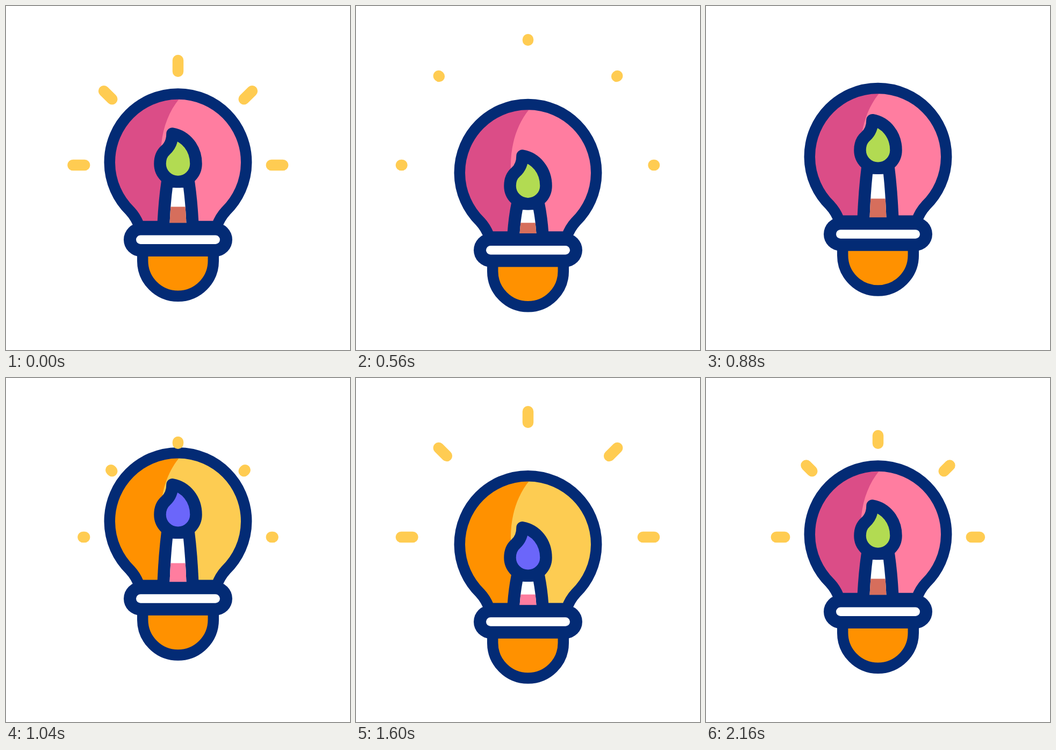
An HTML page that plays this animation: 640 px wide and 640 px high, repeating every 2200 ms.

```html
<!DOCTYPE html>
<html lang="en">
<head>
<meta charset="utf-8">
<title>Bulb and brush</title>
<style>
  html, body { margin: 0; width: 100%; height: 100%; overflow: hidden; background: #fff; }
  svg { display: block; width: 100%; height: 100%; }
  .line { stroke: #032b75; stroke-width: 20.5; stroke-linejoin: round; }
  .navy { fill: #032b75; }
  .ray { stroke: #ffcc52; stroke-width: 20.5; stroke-linecap: round; }
</style>
</head>
<body>
<svg viewBox="0 0 640 640">
  <defs>
    <path id="glassShape" d="M248 410C244 399 238 389 231 381.5A127.2 127.2 0 1 1 409 381.5C402 389 396 399 392 410Z"/>
    <clipPath id="glassClip"><use href="#glassShape"/></clipPath>
    <clipPath id="handleClip"><path id="handleClipPath"/></clipPath>
  </defs>
  <g id="bulb">
    <use id="glass" href="#glassShape"/>
    <path id="shade" clip-path="url(#glassClip)" d="M322 173C300 200 288 237 288 277C288 330 296 372 310 410H170V150H322Z"/>
    <use href="#glassShape" class="line" fill="none"/>
    <path id="handle" class="navy"/>
    <path id="handleInside" fill="#fff"/>
    <rect id="paint" x="300" width="40" height="80" clip-path="url(#handleClip)"/>
    <path id="tip" class="line" style="stroke-width:22.5"
      d="M309.5 237.5C309.5 250 306 260 297 268C290 274 286.5 283 286.5 293.5A33.5 33.5 0 0 0 353.5 293.5C353.5 265 335 242 309.5 237.5Z"/>
    <path class="line" fill="#ff9100" d="M254.2 455V474A65.8 65.8 0 0 0 385.8 474V455Z"/>
    <rect class="navy" x="219" y="403.5" width="202" height="62.5" rx="31.2"/>
    <rect x="242" y="426.5" width="156" height="16.5" rx="8.25" fill="#fff"/>
  </g>
  <g id="rays"></g>
</svg>
<script>
const LOOP = 2200, STEP = 40, BASE = 404;
const $ = id => document.getElementById(id);
const set = (node, attrs) => {
  for (const key in attrs) node.setAttribute(key, attrs[key]);
};
const clamp = u => Math.min(1, Math.max(0, u));
const ease = u => { u = clamp(u); return u * u * (3 - 2 * u); };
const mix = (a, b, u) => a + (b - a) * u;

// Each move is [start, end, value reached].
function track(rest, moves, t) {
  let value = rest;
  for (const [start, end, next] of moves) {
    if (t < start) break;
    value = mix(value, next, ease((t - start) / (end - start)));
  }
  return value;
}

const bulbMoves = [[240, 560, 19.5], [560, 1080, -25], [1120, 1640, 19.5], [1640, 1960, 0]];
const flexMoves = ([rest, low, high]) =>
  [[200, 480, low], [540, 880, high], [1040, 1440, low], [1600, 1880, rest]];
const tipHeights = [0, 22, -15];
const paintHeights = [30.5, 20, 35.3];

const pink = { glass: '#ff7da0', shade: '#db4d87', tip: '#b2db52', paint: '#d66e5c' };
const gold = { glass: '#fdcc52', shade: '#ff9100', tip: '#6b66fa', paint: '#ff7d9f' };

// Inner and outer end of every ray.
const rayLines = [
  [146.2, 296, 84, 296], [197.3, 173.3, 153.8, 130], [320, 121.7, 320, 62.3],
  [442.7, 173.3, 486.2, 130], [493.8, 296, 555, 296]
].map(ends => {
  const node = document.createElementNS('http://www.w3.org/2000/svg', 'line');
  node.setAttribute('class', 'ray');
  $('rays').append(node);
  return { node, ends };
});
const burstStarts = [-215, 970, LOOP - 215];

function drawRays(t) {
  const age = t - burstStarts.filter(start => start <= t).pop();
  const head = ease(age / 540), tail = ease((age - 340) / 480);
  $('rays').style.display = head > 0 && tail < 1 ? '' : 'none';
  for (const { node, ends: [x1, y1, x2, y2] } of rayLines) {
    set(node, {
      x1: mix(x1, x2, tail), y1: mix(y1, y2, tail),
      x2: mix(x1, x2, head) + 0.01, y2: mix(y1, y2, head)
    });
  }
}

// Tapered shape, mirrored around the middle of the stage.
function taper(bottom, top, y) {
  const bend = mix(bottom, top, 0.3), mid = mix(BASE, y, 0.55);
  return `M${320 - bottom} ${BASE + 4}V${BASE}Q${320 - bend} ${mid} ${320 - top} ${y}` +
    `H${320 + top}Q${320 + bend} ${mid} ${320 + bottom} ${BASE}V${BASE + 4}Z`;
}

function draw(t) {
  const lift = track(0, bulbMoves, t);
  const tipY = track(tipHeights[0], flexMoves(tipHeights), t);
  const paintHeight = track(paintHeights[0], flexMoves(paintHeights), t);
  const inside = taper(15.5, 10, 338 + tipY);
  const colors = t >= 960 && t < 1640 ? gold : pink;

  set($('bulb'), { transform: `translate(0 ${lift})` });
  set($('tip'), { transform: `translate(0 ${tipY})` });
  set($('handle'), { d: taper(38.5, 31, 325 + tipY) });
  set($('handleInside'), { d: inside });
  set($('handleClipPath'), { d: inside });
  set($('paint'), { y: BASE - paintHeight });
  for (const part in colors) set($(part), { fill: colors[part] });
  drawRays(t);
}

const began = performance.now();
function tick() {
  const t = (performance.now() - began) % LOOP;
  draw(Math.floor(t / STEP) * STEP);
  requestAnimationFrame(tick);
}
tick();
</script>
</body>
</html>
```
